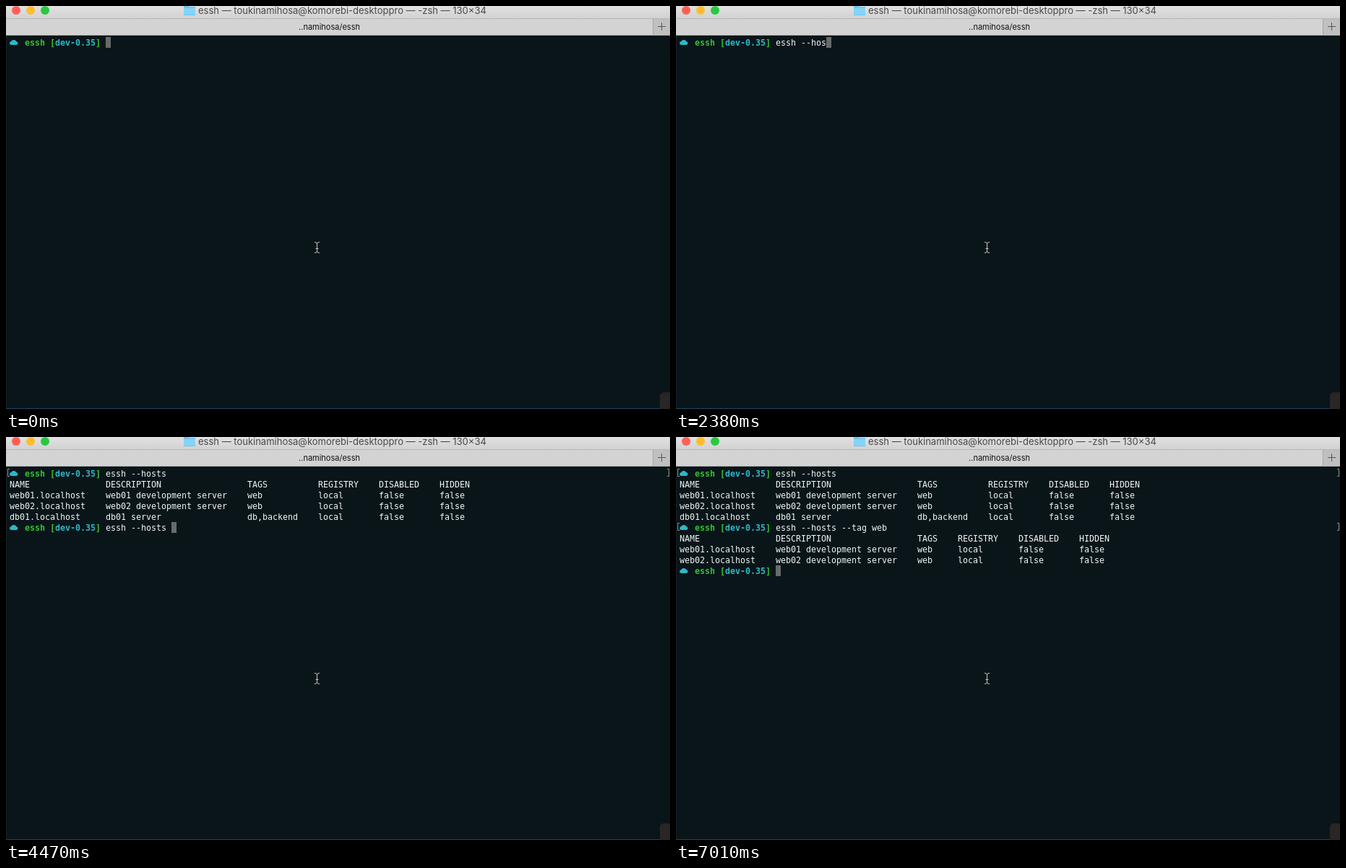
Write an HTML page with a canvas that moves like this. It is 919 by 559 pixels and loops after 8000 ms.

```html
<!DOCTYPE html>
<html lang="en">
<head>
<meta charset="utf-8">
<title>Terminal</title>
<style>
html, body { margin: 0; width: 919px; height: 559px; overflow: hidden; background: #0a1519; }
canvas { display: block; }
</style>
</head>
<body>
<canvas id="stage" width="919" height="559"></canvas>
<script>
const ctx = document.getElementById('stage').getContext('2d');
const LOOP = 8000, CELL = 7, ROW = 15, LEFT = 5, TOP = 43;
const MONO = '"DejaVu Sans Mono", "Noto Sans Mono", monospace';
const SANS = 'Inter, Roboto, sans-serif';
const WHITE = '#f1f6f6', GREEN = '#33c431', CYAN = '#2fb8c8', GREY = '#696a6b';

const FIRST = 'essh --hosts', SECOND = 'essh --hosts --tag web';
// [time, characters typed so far]
const FIRST_KEYS = [[750, 1], [900, 2], [1050, 3], [1190, 4], [1340, 5],
  [1790, 6], [1940, 7], [2090, 9], [2240, 10], [2390, 12]];
const SECOND_KEYS = [[3130, 1], [3430, 2], [3580, 4], [3730, 5], [3870, 6], [4020, 7],
  [4320, 10], [4470, 13], [5520, 14], [5670, 15], [5820, 17],
  [6120, 18], [6270, 19], [6420, 21], [6720, 22]];
const FIRST_DONE = 2530, SECOND_ENTER = 6870, SECOND_DONE = 7010;

const HEAD = ['NAME', 'DESCRIPTION', 'TAGS', 'REGISTRY', 'DISABLED', 'HIDDEN'];
const host = (name, info, tags) => [name + '.localhost', info + ' server', tags, 'local', 'false', 'false'];
const WEB = ['web01', 'web02'].map(n => host(n, n + ' development', 'web'));
const DB = host('db01', 'db01', 'db,backend');

function rect(x, y, w, h, color) {
  ctx.fillStyle = color;
  ctx.fillRect(x, y, w, h);
}

function disc(x, y, rx, ry, color) {
  ctx.fillStyle = color;
  ctx.beginPath();
  ctx.ellipse(x, y, rx, ry, 0, 0, Math.PI * 2);
  ctx.fill();
}

function label(str, x, y, font, color, align = 'left') {
  ctx.font = font;
  ctx.fillStyle = color;
  ctx.textAlign = align;
  ctx.fillText(str, x, y);
}

function put(str, col, row, color = WHITE, weight = '') {
  label(str, LEFT + col * CELL, TOP + row * ROW + 12, `${weight} 11.63px ${MONO}`, color);
}

function cursor(col, row) {
  rect(LEFT + col * CELL, TOP + row * ROW, CELL, ROW, GREY);
}

function prompt(row) {
  const y = TOP + row * ROW;
  disc(8, y + 8.5, 3, 2.5, CYAN);
  disc(10.7, y + 7, 3.4, 3, CYAN);
  disc(13.3, y + 8.5, 3, 2.5, CYAN);
  rect(8, y + 7, 5, 4, CYAN);
  put('essh', 3, row, GREEN, 'bold');
  put('[', 8, row, GREEN, 'bold');
  put('dev-0.35', 9, row, CYAN, 'bold');
  put(']', 17, row, GREEN, 'bold');
}

function marks(row) {
  const y = TOP + row * ROW + 1.5;
  ctx.strokeStyle = '#8b9394';
  ctx.lineWidth = 1;
  ctx.beginPath();
  for (const [x, dx] of [[2.5, 2.5], [917.5, -2.5]]) {
    ctx.moveTo(x + dx, y);
    ctx.lineTo(x, y);
    ctx.lineTo(x, y + 10);
    ctx.lineTo(x + dx, y + 10);
  }
  ctx.stroke();
}

function table(lines, cols, row) {
  lines.forEach((line, i) => line.forEach((cell, j) => put(cell, cols[j], row + i)));
}

function typed(keys, t) {
  return keys.reduce((n, [at, count]) => t >= at ? count : n, 0);
}

function command(str, keys, row, t) {
  const n = typed(keys, t);
  put(str.slice(0, n), 19, row);
  return n;
}

function windowBar() {
  const g = ctx.createLinearGradient(0, 0, 0, 17);
  g.addColorStop(0, '#e1e1e1');
  g.addColorStop(1, '#d2d2d2');
  rect(0, 0, 919, 17, g);
  rect(0, 17, 919, 1, '#b6b6b6');
  rect(0, 18, 919, 22, '#d3d3d3');
  rect(895, 18, 24, 22, '#c0c0c0');
  rect(895, 18, 1, 22, '#a6a6a6');
  rect(0, 40, 919, 1, '#a9adae');
  rect(902, 28, 11, 1, '#555');
  rect(907, 23, 1, 11, '#555');
  ['#ff5f57', '#ffbd2e', '#28c940'].forEach((c, i) => disc(14 + i * 20, 6, 6, 6, c));
  rect(246, 0, 7, 3, '#62bff0');
  rect(246, 1, 16, 12, '#70c6f2');
  rect(246, 3, 16, 9, '#86d3f8');
  label('essh — toukinamihosa@komorebi-desktoppro — -zsh — 130×34', 266, 11, `13px ${SANS}`, '#474747');
  label('..namihosa/essh', 447.5, 33, `11px ${SANS}`, '#111', 'center');
}

function pointer() {
  ctx.lineWidth = 1;
  ctx.strokeStyle = '#c3c8c9';
  ctx.beginPath();
  ctx.moveTo(427, 327.5);
  ctx.quadraticCurveTo(430.5, 327.5, 430.5, 330);
  ctx.lineTo(430.5, 340);
  ctx.quadraticCurveTo(430.5, 342.5, 427, 342.5);
  ctx.moveTo(434, 327.5);
  ctx.quadraticCurveTo(430.5, 327.5, 430.5, 330);
  ctx.moveTo(430.5, 340);
  ctx.quadraticCurveTo(430.5, 342.5, 434, 342.5);
  ctx.moveTo(428.5, 336.5);
  ctx.lineTo(432.5, 336.5);
  ctx.stroke();
}

function backdrop() {
  rect(0, 0, 919, 559, '#0a1519');
  rect(0, 41, 1, 518, '#152226');
  rect(0, 558, 919, 1, '#174564');
  ctx.fillStyle = '#292625';
  ctx.beginPath();
  ctx.roundRect(905, 536, 20, 30, 5);
  ctx.fill();
}

function draw(t) {
  backdrop();
  windowBar();
  prompt(0);
  const first = command(FIRST, FIRST_KEYS, 0, t);
  if (t < FIRST_DONE) {
    cursor(19 + first, 0);
  } else {
    marks(0);
    table([HEAD, ...WEB, DB], [0, 19, 47, 61, 73, 85], 1);
    prompt(5);
    const second = command(SECOND, SECOND_KEYS, 5, t);
    if (t < SECOND_ENTER) {
      cursor(19 + second, 5);
    } else {
      marks(5);
      if (t < SECOND_DONE) {
        cursor(0, 6);
      } else {
        table([HEAD, ...WEB], [0, 19, 47, 55, 67, 79], 6);
        prompt(9);
        cursor(19, 9);
      }
    }
  }
  pointer();
}

const start = performance.now();
function tick() {
  draw((performance.now() - start) % LOOP);
  requestAnimationFrame(tick);
}
tick();
</script>
</body>
</html>
```
